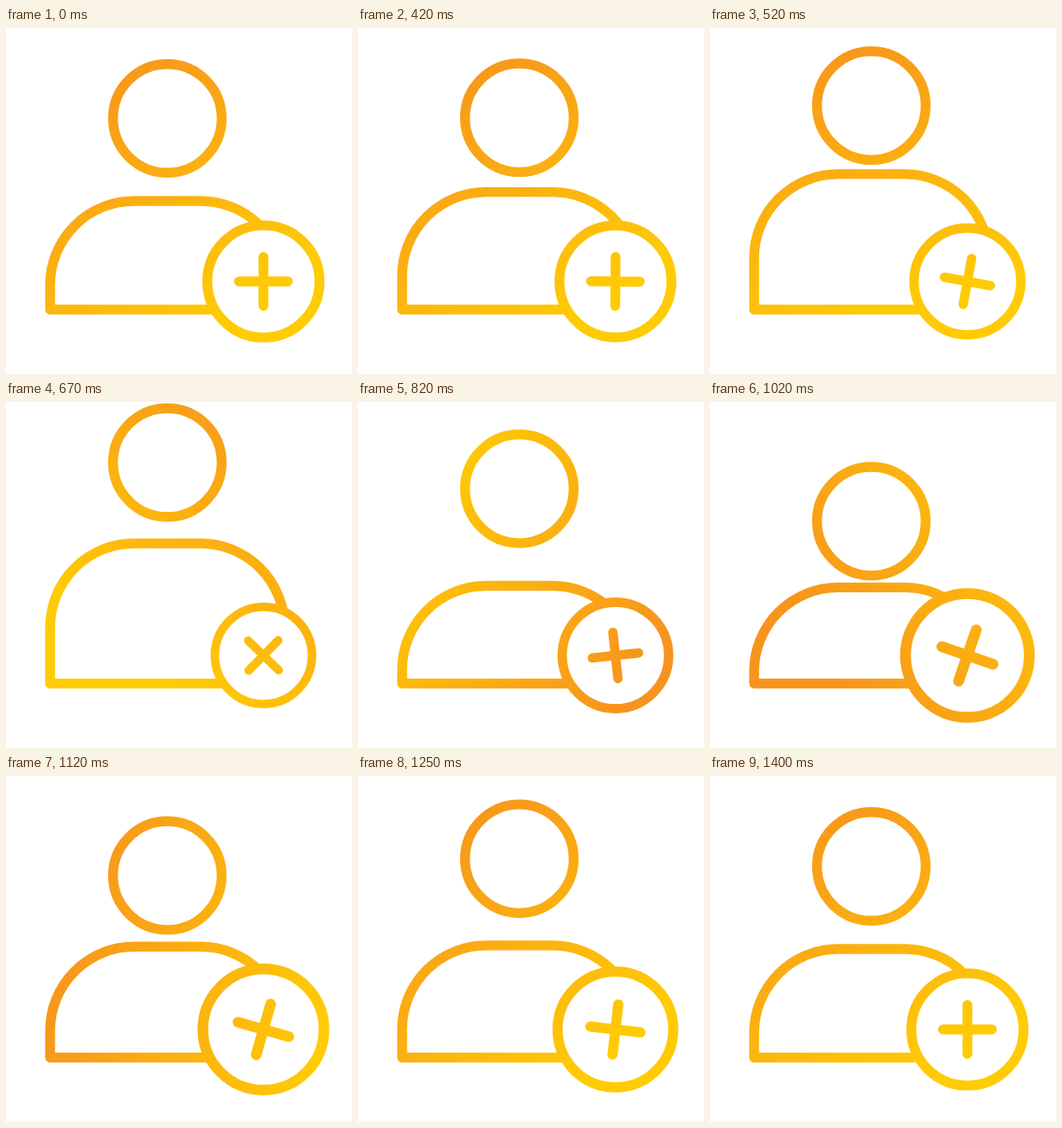
An HTML page for the animation above (1.42 s loop, 400 by 400 pixels).

```html
<!DOCTYPE html>
<html lang="en">
<head>
<meta charset="utf-8">
<title>Add user</title>
<style>
  html, body { margin: 0; width: 100%; height: 100%; overflow: hidden; background: #fff; }
  svg { display: block; width: 100%; height: 100%; }
</style>
</head>
<body>
<svg viewBox="0 0 400 400">
  <defs>
    <linearGradient id="gold" gradientUnits="userSpaceOnUse" x1="235" y1="-15" x2="235" y2="315">
      <stop offset="0" stop-color="#f7941d"/>
      <stop offset="1" stop-color="#ffcb05"/>
    </linearGradient>
  </defs>
  <g fill="none" stroke="url(#gold)" stroke-width="11.4" stroke-linecap="round" stroke-linejoin="round">
    <circle id="head" cx="186.5" r="62.8"/>
    <path id="body"/>
    <circle id="badge" cx="297.6" cy="293" fill="#fff"/>
    <path id="plus"/>
  </g>
</svg>
<script>
const LOOP = 1420, REST = 420, STEP = 25;
const BADGE = { x: 297.6, y: 293, r: 64.9, arm: 28.3, stroke: 11.4 };
const BODY = { left: 51, right: 322, base: 325.5, corner: 97 };

// Each swing eases between its turning points, given as [step, value].
const headY = swing([-1, 104.5], [10, 70], [23, 139], [32.4, 95.5], [39, 104.5]);
const bodyTop = swing([-4, 200], [8, 158.5], [19.5, 227], [30, 194.5], [39, 200]);
const badgeScale = swing([-1, 1], [11.5, 0.86], [22.5, 1.105], [39, 1]);
const plusTurn = swing([-1, 0], [24, 109], [39, 90]);
const gradientTurn = swing([-1, -35], [36, 325]);

const el = id => document.getElementById(id);
const [gold, head, body, badge, plus] = ['gold', 'head', 'body', 'badge', 'plus'].map(el);

function swing(...turns) {
  return step => {
    const next = turns.findIndex(([at]) => at > step);
    if (next < 0) return turns[turns.length - 1][1];
    if (next === 0) return turns[0][1];
    const [[t0, v0], [t1, v1]] = [turns[next - 1], turns[next]];
    return v0 + (v1 - v0) * (1 - Math.cos(Math.PI * (step - t0) / (t1 - t0))) / 2;
  };
}

function bodyPath(top) {
  const { left, right, base, corner } = BODY;
  const side = Math.min(base, top + corner), ry = side - top;
  return `M${left} ${base}V${side}A${corner} ${ry} 0 0 1 ${left + corner} ${top}`
    + `H${right - corner}A${corner} ${ry} 0 0 1 ${right} ${side}V${base}Z`;
}

function plusPath(scale, degrees) {
  const angle = degrees * Math.PI / 180, arm = BADGE.arm * scale;
  const c = arm * Math.cos(angle), s = arm * Math.sin(angle);
  const line = (dx, dy) => `M${BADGE.x - dx} ${BADGE.y - dy}L${BADGE.x + dx} ${BADGE.y + dy}`;
  return line(c, s) + line(-s, c);
}

// The picture rests first, then advances in steps on a 10 ms clock.
function stepAt(time) {
  const moving = time % LOOP - REST;
  return moving < 0 ? LOOP : Math.floor(Math.floor(moving / 10) * 10 / STEP);
}

function draw(time) {
  const step = stepAt(time), scale = badgeScale(step);
  gold.setAttribute('gradientTransform', `rotate(${gradientTurn(step)} 235 150)`);
  head.setAttribute('cy', headY(step));
  body.setAttribute('d', bodyPath(bodyTop(step)));
  badge.setAttribute('r', BADGE.r * scale);
  plus.setAttribute('d', plusPath(scale, plusTurn(step)));
  for (const part of [badge, plus]) part.setAttribute('stroke-width', BADGE.stroke * scale);
}

function tick() {
  draw(performance.now());
  requestAnimationFrame(tick);
}
tick();
</script>
</body>
</html>
```
